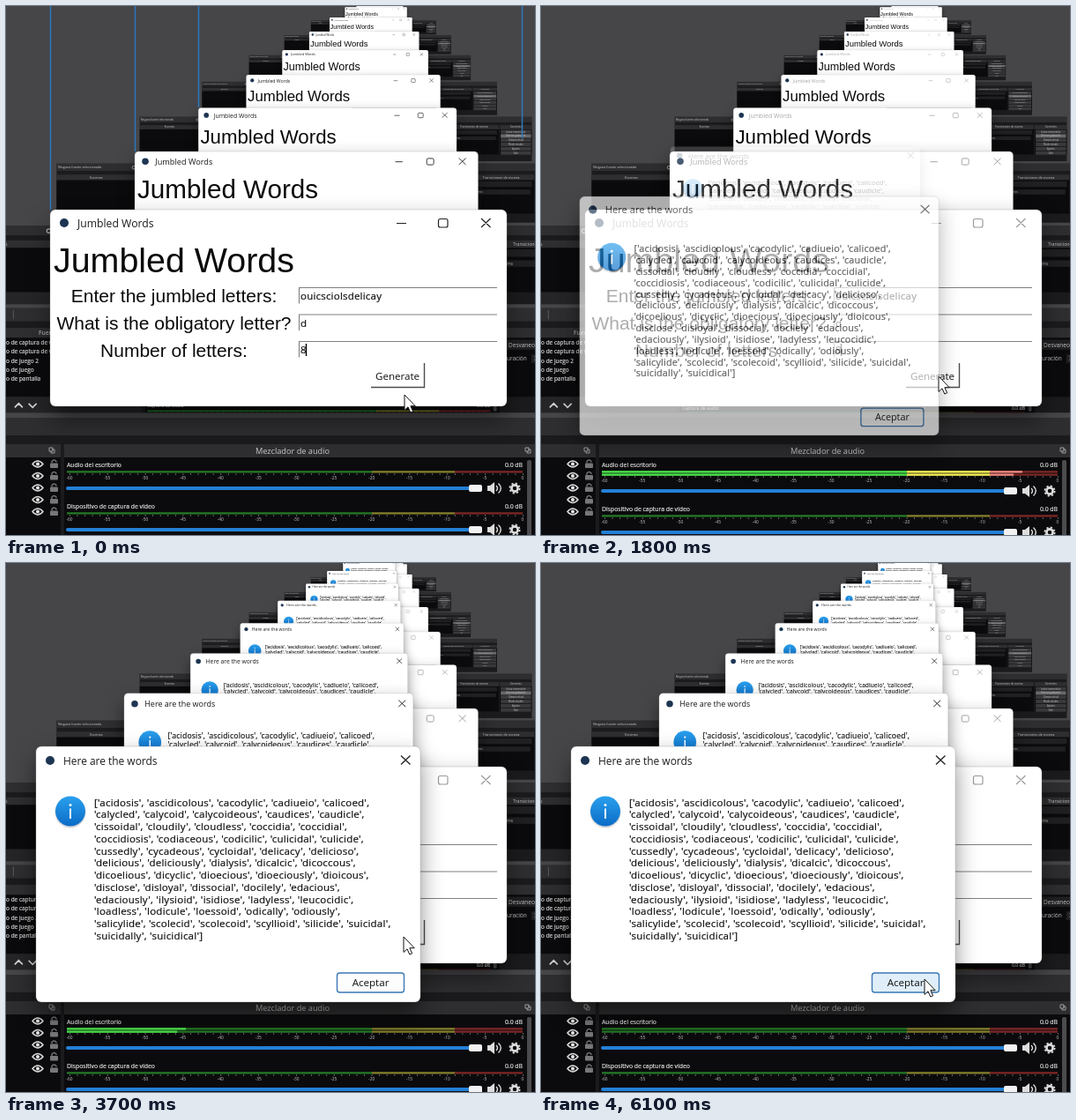
Animation, 600 px wide and 600 px high, one loop 7.4 s. Source, as an HTML page:

```html
<!DOCTYPE html>
<html lang="es">
<head>
<meta charset="utf-8">
<title>Jumbled Words</title>
<style>
html, body { margin: 0; width: 100%; height: 100%; overflow: hidden; background: #464548; }
svg { display: block; width: 100%; height: 100%; }
text { font-family: "Open Sans", "Noto Sans", sans-serif; white-space: pre; }
.big { font-family: "Liberation Sans", Arial, sans-serif; fill: #0a0a0a; }
.mid { text-anchor: middle; }
.pale { fill: #c9c9cb; }
.words { fill: #111; stroke: #111; stroke-width: .2px; letter-spacing: .21px; }
.label { fill: #e2e2e2; stroke: #e2e2e2; stroke-width: .2px; }
</style>
</head>
<body>
<svg id="stage" viewBox="0 0 600 600"></svg>
<script>
const LOOP = 7400, STEP = 100, LEVELS = 9;
const RATIO = 0.752, FX = 437, FY = -35;
const METER_Y = [528.4, 531.6];
const stage = document.getElementById('stage');

const rect = (x, y, w, h, fill, more = '') =>
  `<rect x="${x}" y="${y}" width="${w}" height="${h}" fill="${fill}" ${more}/>`;
const text = (x, y, size, str, more = '') =>
  `<text x="${x}" y="${y}" font-size="${size}" ${more}>${str}</text>`;
const path = (d, stroke, width = 1, more = '') =>
  `<path d="${d}" fill="none" stroke="${stroke}" stroke-width="${width}" ${more}/>`;
const times = (n, fn) => Array.from({ length: n }, (_, i) => fn(i)).join('');

const meterGradient = (id, green, yellow, red) =>
  `<linearGradient id="${id}" gradientUnits="userSpaceOnUse" x1="72" x2="586" y1="0" y2="0">
    <stop offset=".667" stop-color="${green}"/><stop offset=".667" stop-color="${yellow}"/>
    <stop offset=".85" stop-color="${yellow}"/><stop offset=".85" stop-color="${red}"/>
  </linearGradient>`;

function windowFrame(x, y, w, h) {
  return rect(x + 2, y + 14, w - 4, h, '#000', 'opacity=".5" filter="url(#soft)"') +
    rect(x, y, w, h, '#fff', 'rx="6" stroke="#8a8a8a" stroke-opacity=".5" stroke-width=".6"');
}

function meter(y, gradient, more = '') {
  return path(`M69 ${y}H586`, `url(#${gradient})`, 2.4, more);
}

function scale(y) {
  return path(`M72 ${y}H587`, '#98989a', 1.6, 'stroke-dasharray=".8 7.767"') +
    times(13, i => text(72 + i * 42.83, y + 5.6, 4.8, i * 5 - 60, 'class="mid pale"'));
}

function slider(y) {
  return path(`M70 ${y}H530`, '#2380d6', 4, 'stroke-linecap="round"') +
    rect(525, y - 4, 15, 8, '#f2f2f2', 'rx="2"') +
    `<path d="M546 ${y - 3}h3l5-4v14l-5-4h-3z" fill="#ddd"/>` +
    path(`M556 ${y - 3}q3 3 0 6M558.500 ${y - 5.500}q5.500 5.500 0 11`, '#ddd', 1.4) +
    `<circle cx="577" cy="${y}" r="3.600" fill="none" stroke="#ddd" stroke-width="2.600"/>` +
    `<circle cx="577" cy="${y}" r="5.600" fill="none" stroke="#ddd" stroke-width="1.800" stroke-dasharray="2.200 2.200"/>`;
}

function channelHead(name) {
  return text(69, 523, 6.85, name, 'class="label"') +
    text(586, 523, 6.85, '0.0 dB', 'class="label" text-anchor="end"') +
    meter(METER_Y[0], 'dim');
}

function channel(dy, name) {
  return `<g transform="translate(0 ${dy})">${channelHead(name)}${scale(531)}${slider(547)}</g>`;
}

function sourceRow(i) {
  const y = 519.5 + i * 13.5;
  const names = ['o de captura de v', 'o de captura de v', 'o de juego 2', 'o de juego', 'o de pantalla'];
  return text(-144, y + 3, 8.6, names[i], 'class="label"') +
    path(`M30 ${y}q6 -7 12 0q-6 7 -12 0z`, '#d8d8d8', 1.5) +
    `<circle cx="36" cy="${y}" r="2" fill="#e8e8e8"/>` +
    rect(50, y - 1, 9, 5.5, '#77777a', 'rx="1"') +
    path(`M52 ${y - 1}v-2q2.500 -3 5 0v1`, '#77777a', 1.3);
}

function dockIcon(x) {
  return path(`M${x - 3} 501h4v4h-4zM${x} 503h3v4h-4v-2`, '#a8a8aa', 0.9);
}

// Bottom docks of the recorder window
function docks() {
  const panels = [[-456, 228], [-224, 286], [66, 534], [604, 214], [822, 114]];
  return rect(-456, 467, 1392, 160, '#1b1b1d') +
    rect(-456, 467, 1392, 20, '#2e2e30') +
    text(-452, 480, 8.6, 'Ninguna fuente seleccionada', 'class="pale"') +
    path('M-133 470V484', '#555', 1.5) +
    '<circle cx="-250" cy="478" r="4" fill="none" stroke="#bbb" stroke-width="2"/>' +
    panels.map(([x, w]) => rect(x, 497, w, 15, '#2e2e30') + rect(x, 512, w, 89, '#0b0b0d')).join('') +
    rect(-456, 601, 516, 24, '#252527') +
    [[-350, 'Escenas'], [-78, 'Fuentes'], [325, 'Mezclador de audio'],
     [730, 'Transiciones de escena'], [879, 'Controles']]
      .map(([x, s]) => text(x, 507.5, 9.2, s, 'class="mid pale"')).join('') +
    dockIcon(52) + dockIcon(592) +
    times(5, sourceRow) +
    path('M-131 617l6 -6l6 6M-110 611l6 6l6 -6', '#d0d0d0', 2.2) +
    rect(66, 600, 534, 25, '#0b0b0d') +
    channelHead('Audio del escritorio') +
    `<g id="stereo">${meter(METER_Y[1], 'dim')}</g>` +
    `<g id="loud">${METER_Y.map(y => meter(y, 'lit', 'class="bar"')).join('')}</g>` +
    `<g id="below">${scale(531)}${slider(547)}` +
    channel(47, 'Dispositivo de captura de vídeo') + channel(94, 'Captura de audio') + '</g>' +
    rect(591, 515, 5, 108, '#4c4c4f', 'rx="2"') +
    rect(608, 515, 204, 15, '#202022') + text(614, 526, 8.6, 'Desvanecer', 'class="pale"') +
    text(605, 546, 8.6, 'Duración', 'class="pale"') + rect(648, 537, 160, 13, '#202022') +
    text(652, 546, 8.6, '300 ms', 'class="pale"') +
    times(6, i => rect(825, 514 + i * 15, 108, 13, i == 1 ? '#68686b' : '#39393c') +
      text(879, 523.5 + i * 15, 8, ['Iniciar transmisión', 'Detener grabación', 'Cámara virtual',
        'Modo estudio', 'Ajustes', 'Salir'][i], 'class="mid pale"'));
}

function field(y, value) {
  return path(`M332.500 ${y + 18}V${y}H557`, '#808080', 1.1) +
    text(334, y + 13.5, 11.5, value, 'class="words"');
}

function mainWindow() {
  const labels = ['Enter the jumbled letters:', 'What is the obligatory letter?', 'Number of letters:'];
  const values = ['ouicsciolsdelicay', 'd', '8'];
  return windowFrame(50, 231, 518, 223) +
    '<circle cx="66" cy="246" r="5" fill="#1d3552"/>' +
    text(81, 251, 12.2, 'Jumbled Words', 'class="chrome-text"') +
    path('M443 246.500H454M492.500 241.500H499Q501 241.500 501 243.500V249Q501 251 499 251H492.500Q490.500 251 490.500 249V243.500Q490.500 241.500 492.500 241.500ZM539 241L549.500 251M549.500 241L539 251',
      '#222', 1.2, 'class="chrome-line"') +
    text(54, 302, 39.4, 'Jumbled Words', 'class="big"') +
    labels.map((s, i) => text(190.5, 336 + i * 31, 21, s, 'class="big mid"') +
      field(319.5 + i * 30.5, values[i])).join('') +
    path('M340.500 383V397', '#000', 1.4) +
    `<g id="raised">${path('M474.500 405V432.500H414', '#4d4d4d', 1.4)}</g>` +
    `<g id="sunken">${path('M474 406.500H415.500V432', '#4d4d4d', 1.4)}</g>` +
    text(444, 423.5, 11.6, 'Generate', 'id="generate" class="mid" fill="#111"');
}

const words = `['acidosis', 'ascidicolous', 'cacodylic', 'cadiueio', 'calicoed',
'calycled', 'calycoid', 'calycoideous', 'caudices', 'caudicle',
'cissoidal', 'cloudily', 'cloudless', 'coccidia', 'coccidial',
'coccidiosis', 'codiaceous', 'codicilic', 'culicidal', 'culicide',
'cussedly', 'cycadeous', 'cycloidal', 'delicacy', 'delicioso',
'delicious', 'deliciously', 'dialysis', 'dicalcic', 'dicoccous',
'dicoelious', 'dicyclic', 'dioecious', 'dioeciously', 'dioicous',
'disclose', 'disloyal', 'dissocial', 'docilely', 'edacious',
'edaciously', 'ilysioid', 'isidiose', 'ladyless', 'leucocidic',
'loadless', 'lodicule', 'loessoid', 'odically', 'odiously',
'salicylide', 'scolecid', 'scolecoid', 'scyllioid', 'silicide', 'suicidal',
'suicidally', 'suicidical']`.split('\n');

function dialogWindow() {
  return windowFrame(34, 208, 436, 290) +
    '<circle cx="50" cy="224" r="5" fill="#1d3552"/>' +
    text(65, 228.5, 11.95, 'Here are the words', 'fill="#1c1c1c"') +
    path('M448 218.500L458.500 228.500M458.500 218.500L448 228.500', '#222', 1.3) +
    '<circle cx="73" cy="283" r="17.500" fill="#000" opacity=".15"/>' +
    '<circle cx="73" cy="281.500" r="17" fill="url(#blue)"/>' +
    '<circle cx="73" cy="274.500" r="1.500" fill="#fff"/>' + path('M73 278.500V290', '#fff', 2) +
    words.map((s, i) => text(100, 275.7 + i * 13.73, 11.55, s, 'class="words"')).join('') +
    rect(375.5, 465, 76, 22, '#fdfdfd', 'id="accept" rx="3" stroke="#3a78b5" stroke-width="1.400"') +
    text(413.5, 480.2, 11.6, 'Aceptar', 'class="mid" fill="#111"');
}

function level(i) {
  const k = LEVELS - 1 - i;
  return `<g transform="translate(${FX} ${FY}) scale(${RATIO ** k}) translate(${-FX} ${-FY})">
    <g clip-path="url(#screen)"><use href="#docks"/></g>
    <use href="#main"/><use href="#dialog" class="pop" data-depth="${k}"/></g>`;
}

stage.innerHTML = `<defs>
  <filter id="soft" x="-20%" y="-30%" width="140%" height="160%"><feGaussianBlur stdDeviation="14"/></filter>
  <clipPath id="screen">${rect(-456, 467, 1392, 158, '#000')}</clipPath>
  <linearGradient id="blue" x2="0" y2="1"><stop stop-color="#2ba0ee"/><stop offset="1" stop-color="#0a6cc6"/></linearGradient>
  ${meterGradient('dim', '#237a25', '#85802a', '#7f2626')}
  ${meterGradient('lit', '#4be04b', '#f2ee55', '#ef8a80')}
  <g id="docks">${docks()}</g>
  <g id="main">${mainWindow()}</g>
  <g id="dialog">${dialogWindow()}</g>
</defs>
${rect(0, 0, 600, 600, '#464548')}
${times(LEVELS, level)}
<g id="guides">${path('M50.500 0V231M146.500 0V165M218.500 0V115M585.500 0V150', '#2b78bb', 1.5)}</g>
<path id="cursor" d="M0 0V17.500L4 13.800L6.800 20L9.600 18.800L6.900 12.700H12.200Z" fill="#fff" stroke="#111" stroke-width="1"/>`;

const $ = id => document.getElementById(id);
const all = sel => [...stage.querySelectorAll(sel)];
const show = (id, on) => $(id).setAttribute('display', on ? 'inline' : 'none');
const clamp = v => Math.min(1, Math.max(0, v));
const pops = all('.pop'), bars = all('.bar');
const titleText = all('.chrome-text')[0], titleLine = all('.chrome-line')[0];

// Linear track of [time, value] keys
function track(keys, t) {
  const n = keys.findIndex(key => key[0] > t);
  if (n < 0) return keys[keys.length - 1][1];
  if (n == 0) return keys[0][1];
  const [t0, a] = keys[n - 1], [t1, b] = keys[n];
  return a + (b - a) * (t - t0) / (t1 - t0);
}

const cursorX = [[0, 452], [800, 451], [3700, 451], [4500, 443], [4900, 435]];
const cursorY = [[100, 441], [800, 420], [3500, 420], [3700, 424], [4500, 451], [4900, 472]];
const volume = [[1700, 69], [1800, 546], [2600, 424], [3700, 204], [4500, 69]];

function draw(t) {
  const pressed = t >= 1000 && t < 1300;
  const stereo = t >= 1700;
  show('guides', t < 100);
  show('raised', !pressed);
  show('sunken', pressed);
  $('generate').setAttribute('transform', pressed ? 'translate(1 1)' : '');
  titleText.setAttribute('fill', stereo ? '#a5a5a5' : '#1c1c1c');
  titleLine.setAttribute('stroke', stereo ? '#9b9b9b' : '#222');

  const end = track(volume, t);
  show('stereo', stereo);
  show('loud', end > 70);
  $('below').setAttribute('transform', `translate(0 ${stereo ? 3 : 0})`);
  bars.forEach((bar, i) => bar.setAttribute('d', `M69 ${METER_Y[i]}H${end - i * 10}`));

  for (const pop of pops) {
    const u = clamp((t - 1725 - 50 * pop.dataset.depth) / 150);
    const p = 1 - (1 - u) ** 2, s = 0.85 + 0.15 * p * p;
    pop.setAttribute('display', p > 0 ? 'inline' : 'none');
    pop.setAttribute('opacity', p ** 1.4);
    pop.setAttribute('transform',
      `translate(${252 - 18 * (1 - p)} ${353 - 6 * (1 - p)}) scale(${s}) translate(-252 -353)`);
  }

  const h = clamp((t - 4800) / 600);
  $('accept').setAttribute('fill', `rgb(${253 - 29 * h},${253 - 15 * h},${253 - 4 * h})`);
  $('cursor').setAttribute('transform', `translate(${track(cursorX, t)} ${track(cursorY, t)})`);
}

let start, last = -1;
function tick(now) {
  start ??= now;
  const t = Math.floor((now - start) % LOOP / STEP) * STEP;
  if (t !== last) draw(last = t);
  requestAnimationFrame(tick);
}
draw(0);
requestAnimationFrame(tick);
</script>
</body>
</html>
```
